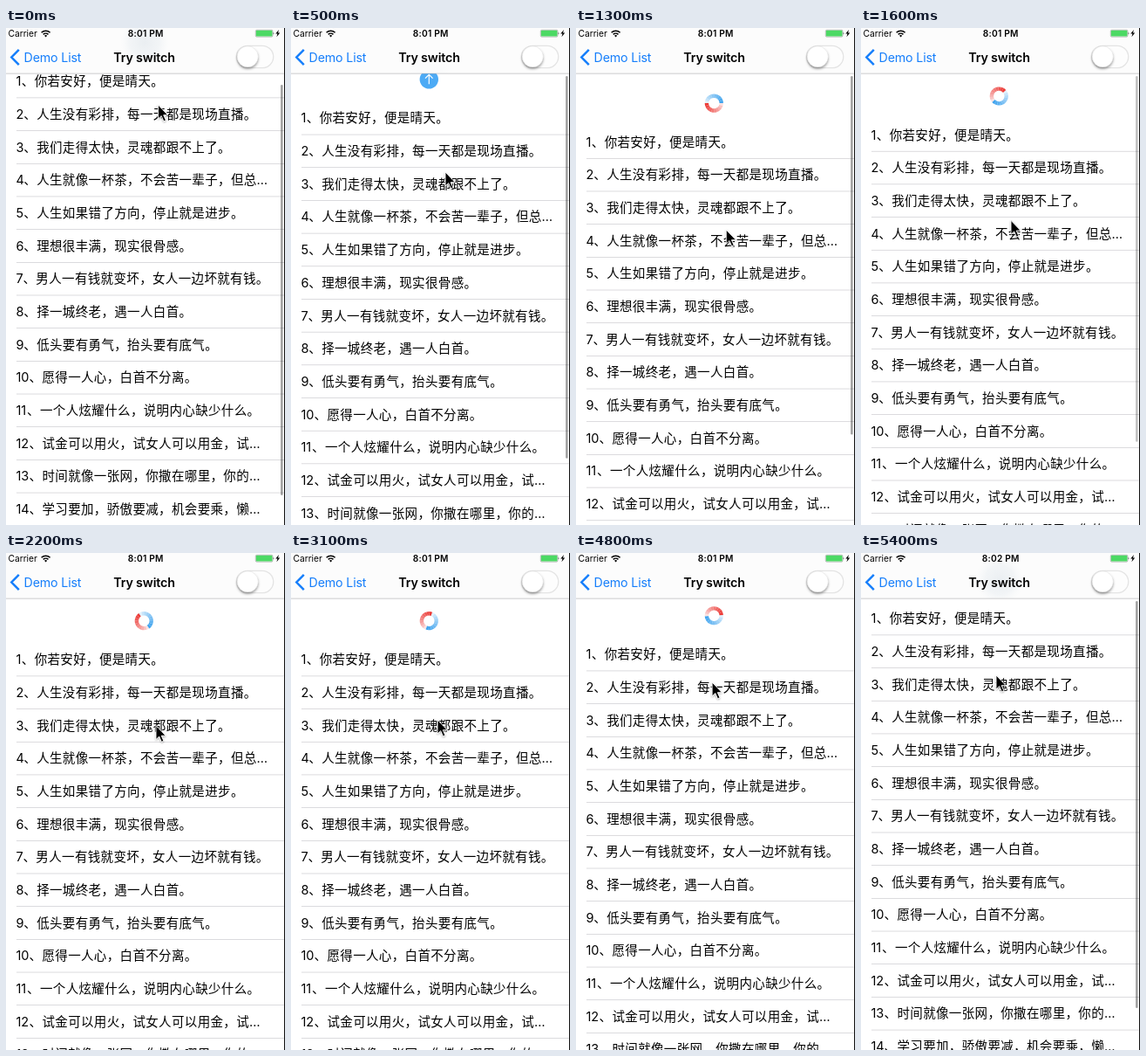
These frames come from a looping animation (320x569 px, 5500 ms). An HTML page:

```html
<!DOCTYPE html>
<html lang="zh-CN">
<head>
<meta charset="utf-8">
<title>Try switch</title>
<style>
html, body { margin: 0; width: 100%; height: 100%; overflow: hidden; background: #fff; }
svg { display: block; width: 100vw; height: 100vh; }
text { font-family: Inter, "Noto Sans CJK SC", "Noto Sans CJK", sans-serif; }
.row { font-size: 14.5px; letter-spacing: .35px; fill: #000; }
.num { letter-spacing: -.2px; }
.status { font-size: 10.2px; }
</style>
</head>
<body>
<svg viewBox="0 0 320 569" preserveAspectRatio="none">
  <defs>
    <radialGradient id="haze">
      <stop offset="0" stop-color="#e2e8ed" stop-opacity=".7"/>
      <stop offset=".6" stop-color="#e8edf1" stop-opacity=".5"/>
      <stop offset="1" stop-color="#f2f5f7" stop-opacity="0"/>
    </radialGradient>
    <clipPath id="navClip"><rect width="320" height="52"/></clipPath>
    <filter id="soft" x="-50%" y="-50%" width="200%" height="200%">
      <feDropShadow dx="0" dy="2" stdDeviation="1.7" flood-opacity=".4"/>
    </filter>
    <filter id="tipShadow" x="-50%" y="-50%" width="200%" height="200%">
      <feDropShadow dx="0" dy="1" stdDeviation=".8" flood-opacity=".35"/>
    </filter>
  </defs>

  <rect width="320" height="569" fill="#fff"/>
  <g id="list"></g>
  <g id="arrow">
    <circle r="10.7" fill="#4caaf5"/>
    <path d="M0 5.5V-5.5M-4.3-1.3L0-5.6L4.3-1.3" fill="none" stroke="#fff" stroke-width="1.2"/>
  </g>
  <g id="spinner"></g>
  <rect id="bar" x="315" y="55" width="2.6" rx="1.3" fill="#000" fill-opacity=".36"/>

  <g clip-path="url(#navClip)">
    <rect width="320" height="52" fill="#fcfcfc"/>
    <circle id="blob" cx="159" r="28" fill="url(#haze)"/>
  </g>
  <rect y="51.8" width="320" height=".6" fill="#a8a8ac"/>

  <text class="status" x="2.5" y="10">Carrier</text>
  <g fill="none" stroke="#000" stroke-width="1.5">
    <path d="M40.6 5.2a7.2 7.2 0 0 1 10 0"/>
    <path d="M42.7 7.4a4.2 4.2 0 0 1 5.8 0"/>
  </g>
  <path d="M45.6 10.4l-1.6-1.7a2.3 2.3 0 0 1 3.2 0z"/>
  <text class="status" id="clock" x="160.2" y="10" text-anchor="middle" font-weight="600" letter-spacing=".2"></text>
  <rect x="286.3" y="2.3" width="19.6" height="7.8" rx="1.3" fill="none" stroke="#555" stroke-width=".4"/>
  <rect x="286.8" y="2.8" width="18.6" height="6.8" rx=".8" fill="#4cd964"/>
  <path d="M306.7 4.8q1.3 1.4 0 2.8z"/>
  <path d="M312.9 2l-3.7 4.6h2.2l-1 3.7 3.8-4.8h-2.2z"/>

  <g fill="#157efb">
    <path d="M14.8 24.8L6.3 33.5l8.5 8.7" fill="none" stroke="#157efb" stroke-width="2.5"/>
    <text x="20.6" y="38.5" font-size="14.2" letter-spacing="-.15">Demo List</text>
  </g>
  <text x="158.5" y="38.5" font-size="14.3" font-weight="600" letter-spacing="-.15" text-anchor="middle">Try switch</text>

  <rect x="264.3" y="20.3" width="42.4" height="25.4" rx="12.7" fill="#fdfdfd" stroke="#e4e4e4" stroke-width="1.3"/>
  <circle cx="277.2" cy="32.8" r="12" fill="#fff" stroke="#000" stroke-opacity=".12" stroke-width=".5" filter="url(#soft)"/>

  <rect x="319" width="1" height="569" fill="#111"/>
  <path id="pointer" d="M0 0V16l3.7-3.4 2.7 6.2 2.5-1.1-2.7-6h5z" fill="#000" stroke="#fff" stroke-width=".9" filter="url(#tipShadow)"/>
</svg>
<script>
const LOOP = 5500, STEP = 100;
const PITCH = 37.68, REST = 71, HOLD = 51, RELEASE = 1200, NAV = 52;
const rows = [
  '你若安好，便是晴天。',
  '人生没有彩排，每一天都是现场直播。',
  '我们走得太快，灵魂都跟不上了。',
  '人生就像一杯茶，不会苦一辈子，但总…',
  '人生如果错了方向，停止就是进步。',
  '理想很丰满，现实很骨感。',
  '男人一有钱就变坏，女人一边坏就有钱。',
  '择一城终老，遇一人白首。',
  '低头要有勇气，抬头要有底气。',
  '愿得一人心，白首不分离。',
  '一个人炫耀什么，说明内心缺少什么。',
  '试金可以用火，试女人可以用金，试…',
  '时间就像一张网，你撒在哪里，你的…',
  '学习要加，骄傲要减，机会要乘，懒…'
];
// time, x, y of the pointer tip
const moves = [
  [0, 174.5, 88], [500, 177, 165], [900, 175, 214], [1200, 172.5, 231],
  [1400, 172, 231], [2000, 172, 199], [2400, 172, 196], [3100, 168, 191],
  [3700, 161.5, 181], [4300, 157.5, 168], [5200, 155, 132], [5500, 155, 144]
];
const narrow = { 1: 6.3, 7: 8 };

const $ = id => document.getElementById(id);
const clamp = v => Math.max(0, Math.min(1, v));
const ease = v => (1 - Math.cos(Math.PI * clamp(v))) / 2;

function add(parent, tag, attrs, text) {
  const el = document.createElementNS('http://www.w3.org/2000/svg', tag);
  for (const k in attrs) el.setAttribute(k, attrs[k]);
  if (text) el.textContent = text;
  parent.appendChild(el);
  return el;
}

function buildList() {
  rows.forEach((line, i) => {
    const y = i * PITCH, num = String(i + 1);
    let x = 11.5;
    add($('list'), 'text', { class: 'row num', x, y: y + 5.3 }, num);
    for (const d of num) x += narrow[d] || 8.8;
    add($('list'), 'text', { class: 'row', x, y: y + 5.3 }, '、' + line);
    add($('list'), 'rect', { x: 12, y: y + 18.6, width: 308, height: .6, fill: '#c4c3c8' });
  });
}

// two half rings, each fading towards its tail
function buildSpinner() {
  const n = 10, r = 8.4;
  for (let i = 0; i < 2 * n; i++) {
    const a = i * Math.PI / n, b = a + Math.PI / n;
    const pt = v => `${r * Math.cos(v)} ${r * Math.sin(v)}`;
    add($('spinner'), 'path', {
      d: `M${pt(a)}A${r} ${r} 0 0 1 ${pt(b)}`,
      fill: 'none', 'stroke-width': 4.4,
      stroke: i < n ? '#ec3a36' : '#3fa3ee',
      opacity: .15 + .85 * Math.pow((i % n) / (n - 1), .8)
    });
  }
}

function pointerAt(t) {
  const i = Math.max(1, moves.findIndex(m => m[0] >= t));
  const [a, b] = [moves[i - 1], moves[i]];
  const k = (t - a[0]) / (b[0] - a[0]);
  return [a[1] + (b[1] - a[1]) * k, a[2] + (b[2] - a[2]) * k];
}

function pullAt(t, py) {
  if (t <= RELEASE) {
    const d = py - 98;
    return d < 0 ? d : d * .5 - d * d * .0003;
  }
  if (t < 4700) return HOLD + 9.5 * (1 - ease((t - RELEASE) / 450));
  if (t < 5200) return HOLD * (1 - ease((t - 4700) / 450));
  return 4 * (t - 5200) / 200;
}

function draw(t) {
  const [px, py] = pointerAt(t);
  const pull = pullAt(t, py), y = REST + pull, cy = y - 44.3;
  const busy = t > RELEASE && t < 5200;

  $('list').setAttribute('transform', `translate(0 ${y})`);
  $('arrow').setAttribute('transform', `translate(158.3 ${cy})`);
  $('arrow').setAttribute('visibility', busy ? 'hidden' : 'visible');
  const turn = (t - 1300) * 360 / 780;
  $('spinner').setAttribute('transform', `translate(158.3 ${cy}) rotate(${turn})`);
  $('spinner').setAttribute('visibility', busy ? 'visible' : 'hidden');
  $('blob').setAttribute('cy', cy);
  $('blob').setAttribute('opacity', clamp((NAV + 11 - cy) / 22));

  $('bar').setAttribute('y', 55 + Math.max(0, -pull));
  $('bar').setAttribute('height', 470 - Math.max(0, pull));
  $('bar').setAttribute('opacity', t >= 5200 ? 1 : 1 - clamp((t - 1500) / 300));

  $('clock').textContent = t < 5000 ? '8:01 PM' : '8:02 PM';
  $('pointer').setAttribute('transform', `translate(${px} ${py})`);
}

function tick() {
  const t = performance.now() % LOOP;
  draw(Math.floor(t / STEP) * STEP);
  requestAnimationFrame(tick);
}

buildList();
buildSpinner();
tick();
</script>
</body>
</html>
```
